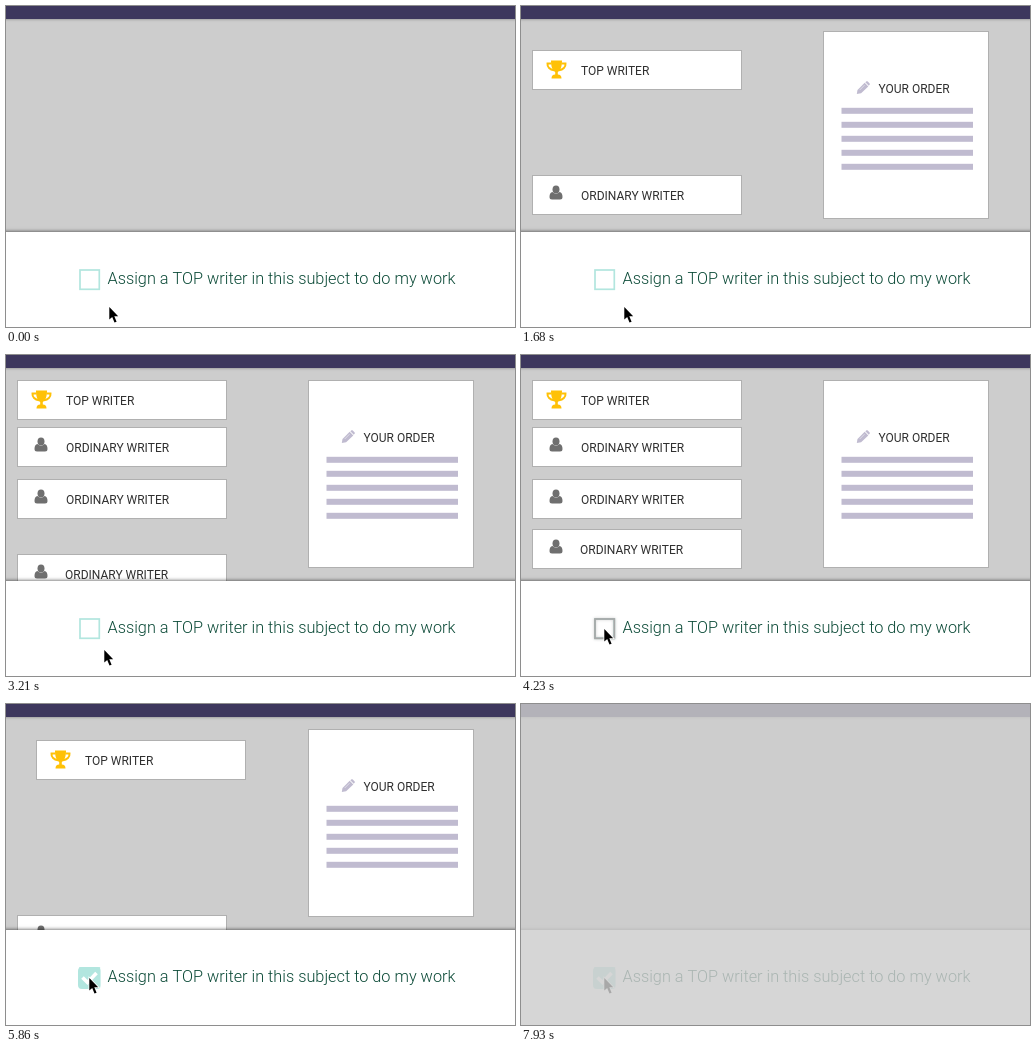
Write an HTML page with a canvas that moves like this. It is 509 px wide and 321 px high and loops after 7.99 s.

```html
<!DOCTYPE html>
<html lang="en">
<head>
<meta charset="utf-8">
<title>Assign a writer</title>
<style>
  html, body { margin: 0; width: 100%; height: 100%; overflow: hidden; background: #cdcdcd; }
  canvas { display: block; }
</style>
</head>
<body>
<canvas id="stage" width="509" height="321"></canvas>
<script>
const W = 509, H = 321, LOOP = 7990, CLICK = 4930, STEP = 30;
const FLOOR = 226;            // cards hide below this line
const LILAC = '#c0bbd0', MINT = '#b2e6df', GOLD = '#ffc107';
const ctx = document.getElementById('stage').getContext('2d');

const progress = (t, from, to) => Math.min(1, Math.max(0, (t - from) / (to - from)));
const lerp = (a, b, p) => a + (b - a) * p;

// Resting place and rise time of each ordinary writer
const ordinary = [
  { y: 72, from: 1216, to: 2470, textX: 49 },
  { y: 124, from: 1738, to: 2992, textX: 49 },
  { y: 174, from: 2590, to: 3780, textX: 48 }
];

function at(x, y, draw) {
  ctx.save();
  ctx.translate(x, y);
  draw();
  ctx.restore();
}

function poly(points) {
  ctx.beginPath();
  points.forEach(([x, y]) => ctx.lineTo(x, y));
  ctx.closePath();
}

function label(text, x, y) {
  ctx.font = '400 12px Roboto, sans-serif';
  ctx.fillStyle = '#303030';
  ctx.fillText(text, x, y);
}

function sheet(w, h) {
  ctx.fillStyle = '#fff';
  ctx.fillRect(0, 0, w + 1, h + 1);
  ctx.lineWidth = 1;
  ctx.strokeStyle = '#b0b0b0';
  ctx.strokeRect(0.5, 0.5, w, h);
}

function trophy() {
  ctx.fillStyle = ctx.strokeStyle = GOLD;
  ctx.lineWidth = 2;
  ctx.beginPath();
  ctx.moveTo(5, 3.4);
  ctx.lineTo(1, 3.4);
  ctx.bezierCurveTo(0.6, 7, 3.5, 9.8, 7.5, 10.2);
  ctx.moveTo(15, 3.4);
  ctx.lineTo(19, 3.4);
  ctx.bezierCurveTo(19.4, 7, 16.5, 9.8, 12.5, 10.2);
  ctx.stroke();
  ctx.beginPath();
  ctx.moveTo(4.5, 0.5);
  ctx.lineTo(15.5, 0.5);
  ctx.bezierCurveTo(15.5, 6, 14.5, 10, 11.3, 12);
  ctx.lineTo(11.3, 14.6);
  ctx.quadraticCurveTo(15, 14.8, 15, 18.4);
  ctx.lineTo(5, 18.4);
  ctx.quadraticCurveTo(5, 14.8, 8.7, 14.6);
  ctx.lineTo(8.7, 12);
  ctx.bezierCurveTo(5.5, 10, 4.5, 6, 4.5, 0.5);
  ctx.fill();
}

function person() {
  ctx.fillStyle = '#6f6f6f';
  ctx.beginPath();
  ctx.ellipse(6.5, 4, 3.5, 4, 0, 0, 7);
  ctx.fill();
  ctx.beginPath();
  ctx.moveTo(3, 6.5);
  ctx.quadraticCurveTo(6.5, 10, 10, 6.5);
  ctx.quadraticCurveTo(13, 7, 13, 11.5);
  ctx.quadraticCurveTo(13, 14, 10.5, 14);
  ctx.lineTo(2.5, 14);
  ctx.quadraticCurveTo(0, 14, 0, 11.5);
  ctx.quadraticCurveTo(0, 7, 3, 6.5);
  ctx.fill();
}

function pencil() {
  ctx.fillStyle = LILAC;
  poly([[0.3, 13], [1, 9], [8.2, 1.8], [11.8, 5.4], [4.6, 12.3]]);
  ctx.fill();
  poly([[8.8, 1.2], [10, 0.2], [11, 0.2], [13.2, 2.4], [13.2, 3.4], [12.3, 4.7]]);
  ctx.fill();
  ctx.strokeStyle = 'rgba(255,255,255,.7)';
  ctx.lineWidth = 0.7;
  ctx.beginPath();
  ctx.moveTo(3.2, 9);
  ctx.lineTo(8, 4.2);
  ctx.stroke();
}

function writerCard(x, y, isTop, textX = 49) {
  at(Math.round(x), Math.round(y), () => {
    sheet(209, 39);
    if (isTop) at(14.5, 10, trophy);
    else at(17.5, 10.5, person);
    label(isTop ? 'TOP WRITER' : 'ORDINARY WRITER', textX, isTop ? 24.5 : 25);
  });
}

function orderCard(x) {
  at(Math.round(x), 25, () => {
    sheet(165, 187);
    at(33.5, 50, pencil);
    label('YOUR ORDER', 55.5, 62);
    ctx.fillStyle = LILAC;
    for (let i = 0; i < 5; i++) ctx.fillRect(18.5, 76.8 + i * 14, 131.5, 6);
  });
}

function cards(t) {
  const fade = 1 - progress(t, 6750, 7340);
  const fall = Math.max(0, t - CLICK - 30) * 0.154;

  ordinary.forEach(c => {
    const y = lerp(FLOOR, c.y, progress(t, c.from, c.to)) + fall;
    if (y < FLOOR) writerCard(11, y, false, c.textX);
  });

  ctx.globalAlpha = fade;
  const slide = Math.max(0, t - 5561) * 0.0636;
  const topY = lerp(FLOOR, 25, progress(t, 560, 1799));
  if (t > 560) writerCard(11 + slide, topY + slide * 0.567, true);

  ctx.globalAlpha = fade * progress(t, 0, 510);
  orderCard(302 - 130 * progress(t, 6530, 7286));
  ctx.globalAlpha = 1;
}

function checkbox(t) {
  const hover = progress(t, 4050, 4230), checked = progress(t, CLICK - 30, 5080);
  ctx.lineWidth = 1.7;
  ctx.strokeStyle = MINT;
  ctx.strokeRect(74, 264, 19.3, 19.3);
  if (hover) {
    ctx.save();
    ctx.globalAlpha = hover * (1 - checked);
    ctx.shadowColor = 'rgba(0,0,0,.25)';
    ctx.shadowBlur = 3;
    ctx.strokeStyle = '#a8a8a8';
    ctx.strokeRect(74, 264, 19.3, 19.3);
    ctx.restore();
  }
  if (checked) {
    ctx.globalAlpha = checked;
    ctx.fillStyle = MINT;
    ctx.beginPath();
    ctx.roundRect(72, 263, 22.5, 22, 4);
    ctx.fill();
    ctx.strokeStyle = '#fff';
    ctx.lineWidth = 3.6;
    ctx.beginPath();
    ctx.moveTo(76.5, 273.5);
    ctx.lineTo(81.5, 278.5);
    ctx.lineTo(90.5, 269);
    ctx.stroke();
    ctx.globalAlpha = 1;
  }
}

function cursor(t) {
  const p = progress(t, 2890, 4230);
  at(Math.round(lerp(103, 83, p)), Math.round(lerp(301, 274, p)), () => {
    poly([[0.3, 0], [0.3, 12.6], [3.2, 10], [5.5, 15.6], [7.6, 14.7], [5.3, 9.3], [9.2, 9.2]]);
    ctx.strokeStyle = 'rgba(255,255,255,.9)';
    ctx.lineWidth = 1.6;
    ctx.stroke();
    ctx.fillStyle = '#000';
    ctx.fill();
  });
}

function bar(y, h, color, shadow, blur) {
  ctx.save();
  ctx.shadowColor = shadow;
  ctx.shadowBlur = blur;
  ctx.fillStyle = color;
  ctx.fillRect(-10, y, W + 20, h);
  ctx.restore();
}

function draw(t) {
  ctx.fillStyle = '#cdcdcd';
  ctx.fillRect(0, 0, W, H);
  cards(t);
  bar(-10, 23, '#3d375d', 'rgba(0,0,0,.4)', 3);
  bar(FLOOR, H, '#fff', 'rgba(0,0,0,.75)', 4);
  checkbox(t);
  ctx.font = '300 16.3px Roboto, sans-serif';
  ctx.fillStyle = '#0b4a37';
  ctx.fillText('Assign a TOP writer in this subject to do my work', 101.5, 278);
  cursor(t);
  ctx.globalAlpha = 0.82 * progress(t, 7330, 7930);
  ctx.fillStyle = '#cdcdcd';
  ctx.fillRect(0, 0, W, H);
  ctx.globalAlpha = 1;
}

// Motion advances in even steps, restarted by the click
function stepped(t) {
  const base = t < CLICK ? 0 : CLICK;
  return Math.min(7930, base + Math.floor((t - base) / STEP) * STEP);
}

const start = performance.now();
function tick() {
  draw(stepped((performance.now() - start) % LOOP));
  requestAnimationFrame(tick);
}
tick();
</script>
</body>
</html>
```
